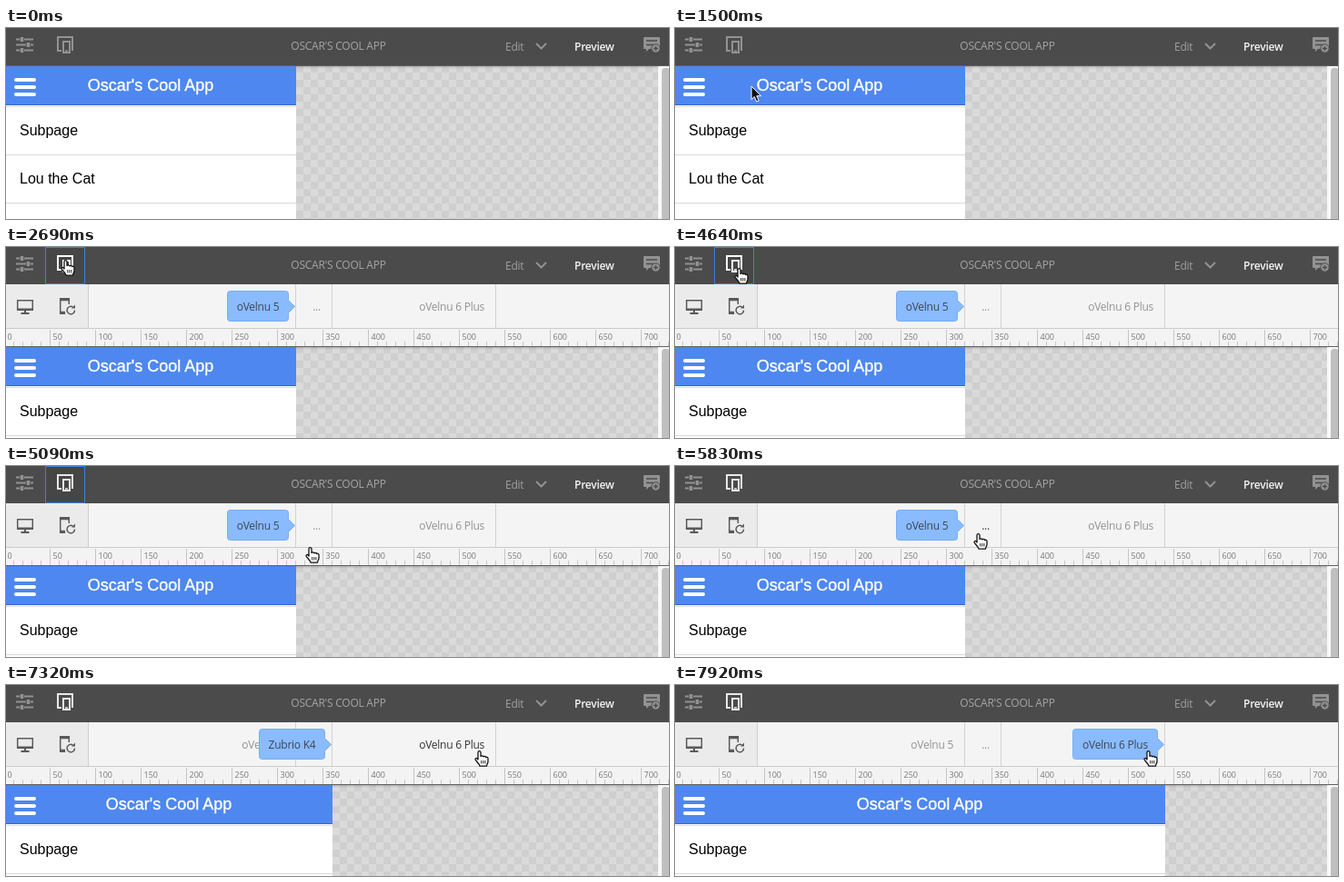
Write an HTML page that moves like this. It is 729 by 210 pixels and loops after 8000 ms.

```html
<!DOCTYPE html>
<html lang="en">
<head>
<meta charset="utf-8">
<title>Device preview</title>
<style>
html, body { margin: 0; width: 100%; height: 100%; overflow: hidden; background: #fff; }
svg { display: block; width: 729px; height: 210px; }
text { white-space: pre; }
.ui { font-family: "Open Sans", "Noto Sans", sans-serif; font-size: 12px; letter-spacing: -.25px; }
.app { font-family: "Liberation Sans", Arial, sans-serif; font-size: 16px; }
.line { fill: none; stroke-width: 2; }
.ruler { font-size: 9px; letter-spacing: 0; fill: #777; }
</style>
</head>
<body>
<svg viewBox="0 0 729 210">
  <defs>
    <pattern id="checker" x="319" y="41" width="16" height="16" patternUnits="userSpaceOnUse">
      <path d="M0 0h16v16H0z" fill="#dadada"/>
      <path d="M0 0h8v8H0zM8 8h8v8H8z" fill="#cfcfcf"/>
    </pattern>
    <linearGradient id="shade" x2="0" y2="1">
      <stop stop-opacity=".22"/>
      <stop offset="1" stop-opacity="0"/>
    </linearGradient>
  </defs>

  <g id="page" class="app">
    <path d="M0 41h717v170H0z" fill="url(#checker)"/>
    <path d="M0 41h717v4H0z" fill="url(#shade)"/>
    <path d="M717 41h12v170h-12z" fill="#f8f8f8"/>
    <rect x="721" y="44" width="9" height="180" rx="4" fill="#bfbfbf"/>
    <rect class="wide" y="41" height="170" fill="#fff"/>
    <rect class="wide" y="41" height="44" fill="#4e87ef"/>
    <rect class="wide" y="84" height="1" fill="#3568cc"/>
    <rect class="wide" y="86" height="1" fill="#dcdcdc"/>
    <rect class="wide" y="139" height="1" fill="#d9d9d9"/>
    <rect class="wide" y="192" height="1" fill="#d9d9d9"/>
    <path d="M0 41.500h729" stroke="#606060"/>
    <path d="M11 57h20M11 65h20M11 73h20" stroke="#fff" stroke-width="4" stroke-linecap="round"/>
    <text id="heading" y="69" font-size="18" fill="#fff" stroke="#fff" stroke-width=".35" text-anchor="middle">Oscar's Cool App</text>
    <text x="15" y="118">Subpage</text>
    <text x="15" y="171">Lou the Cat</text>
  </g>

  <g id="emulator" class="ui">
    <path d="M0 41h729v49H0z" fill="#f4f4f4"/>
    <path d="M0 41h90v49H0z" fill="#ebebeb"/>
    <path d="M90.500 41v49" stroke="#cfcfcf"/>
    <g fill="none" stroke="#5a5a5a" stroke-width="1.500">
      <path d="M12.700 58.700h16.600v10.600H12.700z"/>
      <path d="M13 68.500h16M21 69v4M16.500 73h9" stroke-width="2"/>
      <path d="M69.300 63v-6.300h-9.600v16.600h5.500"/>
      <path d="M60 58h9M60 72h5" stroke-width="2.500"/>
      <path d="M73.500 66a4.200 4.200 0 1 0 2 3.500"/>
      <path d="M72 67.500h4v-4z" fill="#5a5a5a" stroke="none"/>
    </g>
    <g id="devices"></g>
    <path id="bubble" transform="translate(.5 .5)" fill="#8abbff" stroke="#78adf2"/>
    <text id="chosen" y="70" fill="#3c4654" text-anchor="middle"></text>
    <path d="M0 90h729v19H0z" fill="#f3f3f3"/>
    <path d="M0 89.500h729" stroke="#cbcbcb"/>
    <g id="ruler" class="ruler"></g>
  </g>

  <g class="ui">
    <path d="M0 0h729v41H0z" fill="#4b4b4b"/>
    <path id="focus" d="M43.500 .5h43v40h-43z" fill="#464646" stroke="#3e7fdf"/>
    <g class="line" stroke="#929292">
      <path d="M11 12.500h4m5 0h10M11 18.500h11m5 0h3M11 24.500h4m5 0h10" stroke-width="1.800"/>
      <path d="M17.500 10v5M24.500 16v5M17.500 22v5" stroke-width="3.500"/>
      <path d="M583 17l5.500 5.500L594 17"/>
    </g>
    <path d="M702 10h16q1 0 1 1v12h-12l-3 3v-3h-2q-1 0-1-1V11q0-1 1-1z" fill="#929292"/>
    <path d="M704 14h12M704 18.500h8" stroke="#4b4b4b" stroke-width="1.500"/>
    <circle cx="714.500" cy="22.500" r="4.700" fill="#929292" stroke="#4b4b4b"/>
    <path d="M714.500 20v5M712 22.500h5" stroke="#4b4b4b" stroke-width="1.300"/>
    <g id="device" class="line">
      <path d="M61 25h-4V10h16v15"/>
      <path d="M63 15h7v12h-7z"/>
      <path d="M65 25h3" stroke-width="1.500"/>
    </g>
    <text x="365.500" y="24" fill="#a5a5a5" text-anchor="middle">OSCAR'S COOL APP</text>
    <text x="549" y="24.500" fill="#a0a0a0">Edit</text>
    <text x="625" y="24.500" fill="#f4f4f4" font-weight="600">Preview</text>
  </g>

  <g id="cursor" stroke-linejoin="round">
    <g id="hand">
      <path d="M4 10V2.200a1.500 1.500 0 0 1 3 0V6.500c.4-1 2.700-.9 2.900.4.600-.9 2.500-.6 2.600.6.700-.6 2.500-.2 2.500 1.200V12c0 2.200-1.400 3-1.600 5.200H6C5.600 15 2.800 12.500 1.200 10.400c-.8-1.400 1-2.500 2-1.500z" fill="#fff" stroke="#111" stroke-width="1.300"/>
      <path d="M7.700 11v3.500M9.800 11v3.500M11.900 11v3.500" stroke="#111" stroke-width=".9"/>
    </g>
    <path id="arrow" d="M1 1v14.500l3.300-3L6.700 18l2.500-1-2.400-5.300h4.700z" fill="#111" stroke="#fff"/>
  </g>
</svg>
<script>
const LOOP = 8000;
const GREY = "#929292";
const $ = id => document.getElementById(id);
const show = (el, on) => el.setAttribute("display", on ? "inline" : "none");

function add(parent, tag, attrs, text = "") {
  const el = document.createElementNS("http://www.w3.org/2000/svg", tag);
  for (const key in attrs) el.setAttribute(key, attrs[key]);
  el.textContent = text;
  parent.append(el);
  return el;
}

// edge: right side of the device on the ruler; bubble: width of its label when chosen;
// hover: when the pointer is over the label
const devices = [
  { name: "oVelnu 5", label: "oVelnu 5", edge: 318, bubble: 68, hover: [0, 0] },
  { name: "Zubrio K4", label: "...", edge: 358, bubble: 73, hover: [5240, 7020] },
  { name: "oVelnu 6 Plus", label: "oVelnu 6 Plus", edge: 538, bubble: 94, hover: [7020, LOOP] }
];

for (const d of devices) {
  add($("devices"), "path", { d: `M${d.edge + .5} 41v49`, stroke: "#d2d2d2" });
  d.text = add($("devices"), "text", { x: d.edge - 12, y: 70, "text-anchor": "end" }, d.label);
}

for (let n = 0; n <= 730; n += 10) {
  const major = n % 50 === 0;
  add($("ruler"), "path", { d: `M${n - 1.5} 109v${major ? -18 : -5}`, stroke: "#c6c6c6" });
  if (major) add($("ruler"), "text", { x: n + 1.5, y: 102 }, n);
}

// [time, x, y, is arrow]
const stops = [
  [1200, 114, 171], [1350, 96, 112], [1500, 83, 63, true], [1650, 68, 40],
  [1800, 62, 26], [1950, 60, 14], [4640, 65, 23], [4790, 192, 84],
  [4940, 325, 94, true], [5090, 329, 89], [5240, 328, 77], [5380, 328, 74],
  [6870, 338, 74], [7020, 428, 73], [7170, 500, 72], [7320, 515, 72]
];

function drawCursor(t) {
  const stop = stops.filter(s => s[0] <= t).pop();
  show($("cursor"), stop);
  if (!stop) return;
  const [, x, y, arrow] = stop;
  $("cursor").setAttribute("transform", `translate(${x} ${y})`);
  show($("arrow"), arrow);
  show($("hand"), !arrow);
}

function drawDevices(t, active) {
  const { name, edge, bubble } = active;
  for (const d of devices) {
    const [from, to] = d.hover;
    show(d.text, d !== active);
    d.text.setAttribute("fill", t >= from && t < to ? "#333" : GREY);
  }

  const right = edge - 8, left = right - bubble + 1;
  $("bubble").setAttribute("d",
    `M${left + 3} 48H${right - 3}q3 0 3 3V58l7 7-7 7v6q0 3-3 3H${left + 3}q-3 0-3-3V51q0-3 3-3z`);
  $("chosen").setAttribute("x", (left + right + 1) / 2);
  $("chosen").textContent = name;
}

function draw(t) {
  const open = t >= 2690;
  const active = devices[t < 6120 ? 0 : t < 7920 ? 1 : 2];
  const width = active.edge + 1;

  $("page").setAttribute("transform", `translate(0 ${open ? 68 : 0})`);
  for (const el of document.querySelectorAll(".wide")) el.setAttribute("width", width);
  $("heading").setAttribute("x", width / 2 - .5);

  show($("emulator"), open);
  show($("focus"), t >= 2390 && t < 5830);
  $("device").setAttribute("stroke", t < 1650 ? GREY : t < 4790 ? "#fff" : "#e8e8e8");
  drawDevices(t, active);
  drawCursor(t);
}

const start = performance.now();
function tick() {
  draw((performance.now() - start) % LOOP);
  requestAnimationFrame(tick);
}
tick();
</script>
</body>
</html>
```
